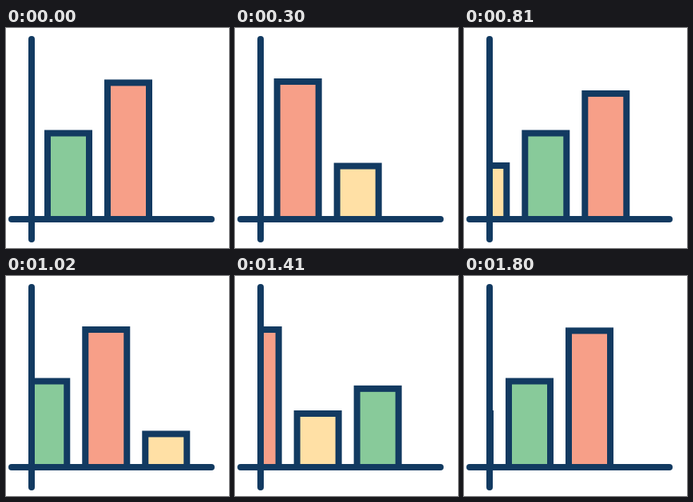
An HTML page with a canvas for the animation above (1830 ms loop, 279x275 px).

```html
<!DOCTYPE html>
<html lang="en">
<head>
<meta charset="utf-8">
<title>Scrolling bar chart</title>
<style>
  html, body { margin: 0; width: 100%; height: 100%; overflow: hidden; background: #fff; }
  canvas { display: block; }
</style>
</head>
<body>
<canvas id="chart" width="279" height="275"></canvas>
<script>
const ctx = document.getElementById('chart').getContext('2d');
const LOOP = 1830, STEP = 30;
const SPEED = 446 / 1800;   // px per ms
const GAP = 75, BASE = 239;
const GROW = 372, GROW_EVERY = 300, FIRST_GROW = -560;
const INK = '#123a61';
const BARS = [
  { color: '#88ca9a', height: 107.5 },
  { color: '#f79f88', height: 172 },
  { color: '#ffe0a5', height: 67 }
];

const easeOut = u => 1 - (1 - u) ** 4;

function drawBar(k, t) {
  const age = Math.min(1, (t - FIRST_GROW - k * GROW_EVERY) / GROW);
  if (age <= 0) return;
  const { color, height } = BARS[k % 3];
  const h = height * easeOut(age);
  const x = 52 + k * GAP - t * SPEED;
  ctx.fillStyle = color;
  ctx.fillRect(x, BASE - h, 52, h);
  ctx.strokeRect(x, BASE - h, 52, h);
}

function drawLine(x1, y1, x2, y2) {
  ctx.beginPath();
  ctx.moveTo(x1, y1);
  ctx.lineTo(x2, y2);
  ctx.stroke();
}

function draw(now) {
  const t = Math.floor(now % LOOP / STEP) * STEP;
  ctx.fillStyle = '#fff';
  ctx.fillRect(0, 0, 279, 275);
  ctx.strokeStyle = INK;
  ctx.lineWidth = 8;
  ctx.lineCap = 'round';

  ctx.save();
  ctx.beginPath();
  ctx.rect(32, 0, 207, BASE);
  ctx.clip();
  for (let k = 0; k < 9; k++) drawBar(k, t);
  ctx.restore();

  drawLine(32, 14, 32, 264);
  drawLine(7, BASE, 257, BASE);
}

const start = performance.now();
function tick() {
  draw(performance.now() - start);
  requestAnimationFrame(tick);
}
tick();
</script>
</body>
</html>
```
